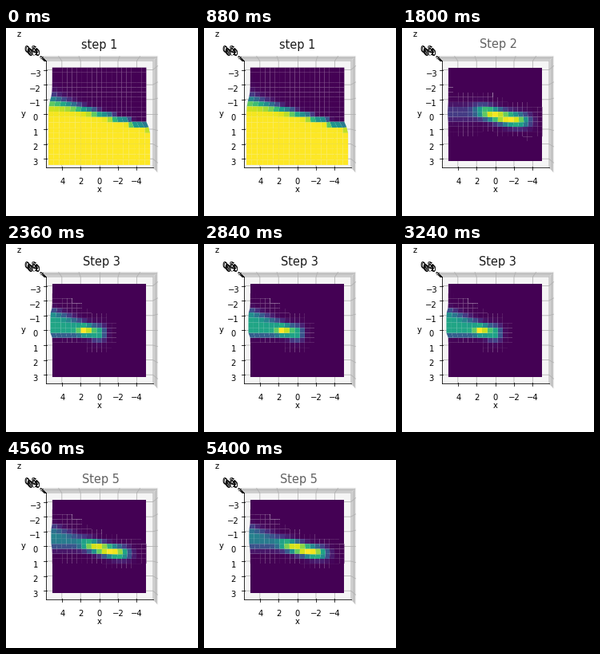
These frames come from a looping animation (240 px wide and 236 px high, 5.44 s). A matplotlib script:

```python
import numpy as np
import matplotlib.pyplot as plt
from matplotlib.animation import FuncAnimation
from matplotlib.ticker import MultipleLocator

W, H, DPI = 240, 236, 72
FRAMES, INTERVAL = 136, 40
SIDE = 217.44            # side of the square 3D axes, px
CX, CY = 116.6, 108.4    # projected centre of the box, px
PAD = 1.1 * 25 / 24      # data range to axis range
TOP = 0.9                # height of every surface
DARK, GREY = "#1a1a1a", "#626262"

plt.rcParams["font.family"] = "DejaVu Sans"

X, Y = np.meshgrid(np.linspace(-5, 5, 20), np.linspace(-np.pi, np.pi, 20))


def sigmoid(t):
    return 1 / (1 + np.exp(-t))


def gauss(t):
    return np.exp(-t ** 2 / 2)


def bump(x, y, sx, sy):
    return gauss((X - x) / sx) * gauss((Y - y) / sy)


def ridge(center, x, reach, width):
    """Band along a curve, flat-topped in x."""
    return np.exp(-((X - x) / reach) ** 4) * gauss((Y - center) / width)


def wedge(bottom, soft):
    """Plateau that widens to the left."""
    upper = sigmoid((Y + 0.02 + 0.26 * X) / 0.1)
    return sigmoid((X - 1) / 0.2) * upper * sigmoid((bottom - Y) / soft)


def cliff():
    d = Y + 0.08 + 0.18 * X
    return 0.98 * sigmoid(d / (0.05 * np.exp(0.3 * X))) + 0.02 * sigmoid(d / 0.7)


bend = -0.4 * np.tanh(X / 2)
shapes = [
    cliff(),
    ridge(0.05 + bend, -0.8, 2.6, 0.25)
    + 0.16 * sigmoid((X - 1.5) / 0.4) * gauss((Y + 0.1) / 0.33),
    0.45 * wedge(0.36, 0.04)
    + 0.72 * bump(1.25, 0, 0.48, 0.2) + 0.72 * bump(0.1, 0.17, 0.4, 0.27),
    0.8 * ridge(0.18 - 0.155 * X, -1.3, 3.7, 0.23)
    + 0.2 * bump(-0.4, 0.25, 1, 0.25) + 0.28 * wedge(0.05, 0.1),
    ridge(0.1 + bend, -0.7, 2.3, 0.21) + 0.32 * wedge(0.05, 0.1),
]

# title centre x, baseline y, colour
titles = [(116.2, 25.7, DARK), (120.8, 25, GREY), (119, 27.5, DARK),
          (120, 27.5, GREY), (118, 28.5, GREY)]

fig = plt.figure(figsize=(W / DPI, H / DPI), dpi=DPI, facecolor="white")
anchor = SIDE * 0.95 / 1.85
ax = fig.add_axes([(CX - anchor) / W, (H - CY - anchor) / H, SIDE / W, SIDE / H],
                  projection="3d")
# A hair off straight down keeps the far walls at the top and right.
ax.view_init(elev=90 - 1e-3, azim=90 - 2e-5)

surfaces = [ax.plot_surface(X, Y, z * TOP / z.max(), cmap="viridis") for z in shapes]

ax.set_xlim(-5 * PAD, 5 * PAD)
ax.set_ylim(-np.pi * PAD, np.pi * PAD)
ax.set_zlim(TOP * (1 - PAD) / 2, TOP * (1 + PAD) / 2)
ax.xaxis.set_major_locator(MultipleLocator(2))
ax.yaxis.set_major_locator(MultipleLocator(1))
ax.zaxis.set_major_locator(MultipleLocator(0.2))
ax.set(xlabel="x", ylabel="y", zlabel="z")

title = fig.text(0, 0, "", ha="center", va="baseline", fontsize=14.5)


def draw(i):
    step = i * len(shapes) // FRAMES
    for k, surface in enumerate(surfaces):
        surface.set_visible(k == step)
    x, y, color = titles[step]
    word = "Step" if step else "step"
    title.set(text=f"{word} {step + 1}", position=(x / W, 1 - y / H), color=color)
    return [title, *surfaces]


anim = FuncAnimation(fig, draw, frames=FRAMES, interval=INTERVAL,
                     repeat=True, repeat_delay=0, blit=False)
plt.show()
```
